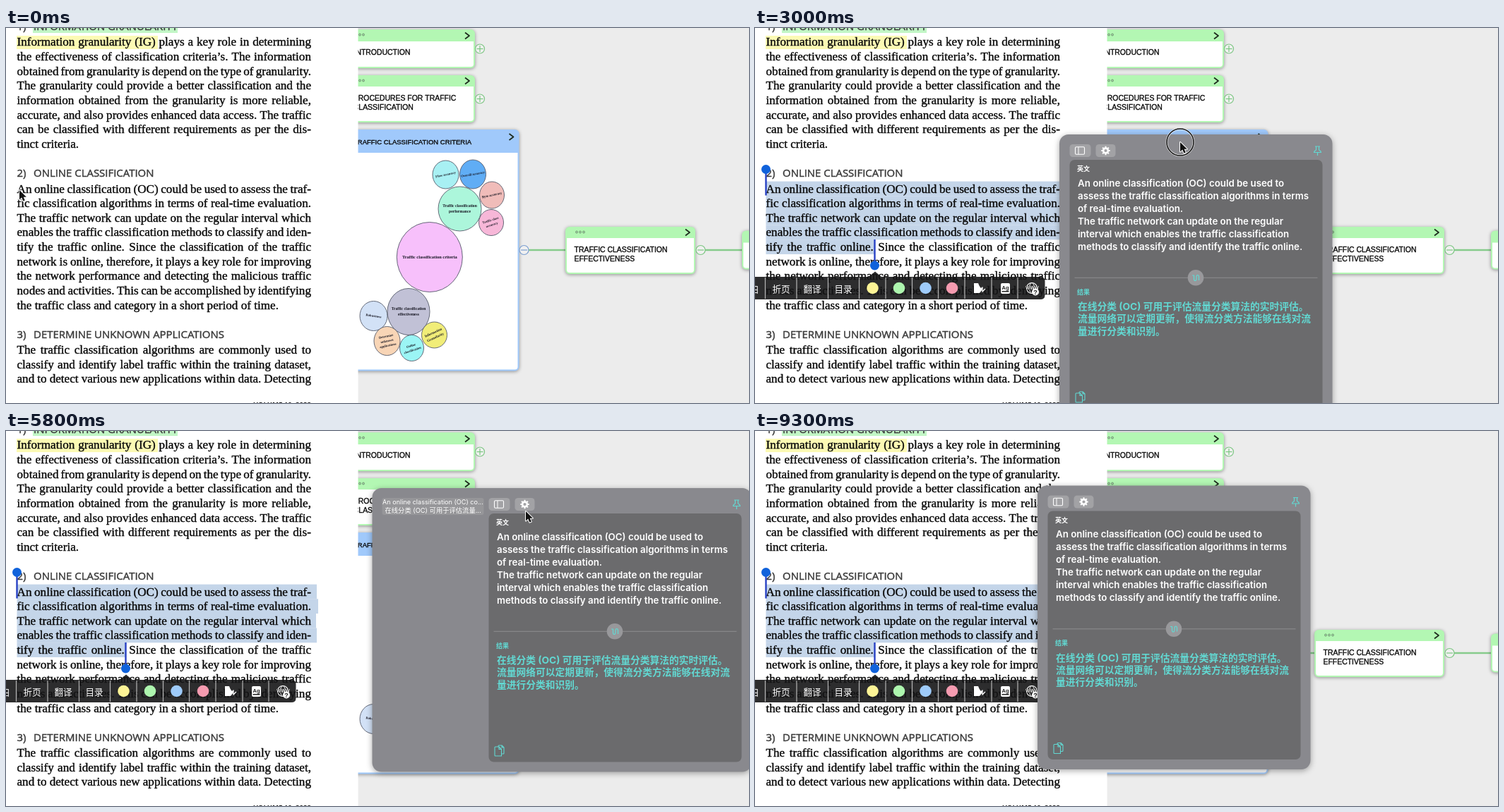
These frames come from a looping animation (1052 by 532 pixels, 9.4 s). An HTML page with a canvas:

```html
<!DOCTYPE html>
<html lang="en">
<head>
<meta charset="utf-8">
<title>Translate selection</title>
<style>
html, body { margin: 0; width: 100%; height: 100%; overflow: hidden; background: #ececec; }
canvas { display: block; }
</style>
</head>
<body>
<canvas id="stage" width="1052" height="532"></canvas>
<script>
const g = document.getElementById('stage').getContext('2d');
const LOOP = 9400, PITCH = 20.65, LEFT = 15.5, COLUMN = 416.5;
const SERIF = '"Liberation Serif", Times, serif';
const SANS = '"Liberation Sans", Arial, sans-serif';
const HEAD = '"Open Sans", sans-serif';
const UI = 'Inter, "Noto Sans CJK SC", "Noto Sans CJK", sans-serif';
const TEAL = '#62d8d2', GREEN = '#b3f7b3';

const paragraphs = [
  { y: 25.4, lines: [
    'Information granularity (IG) plays a key role in determining',
    'the effectiveness of classification criteria’s. The information',
    'obtained from granularity is depend on the type of granularity.',
    'The granularity could provide a better classification and the',
    'information obtained from the granularity is more reliable,',
    'accurate, and also provides enhanced data access. The traffic',
    'can be classified with different requirements as per the dis-',
    'tinct criteria.'], ends: true },
  { y: 233.5, lines: [
    'An online classification (OC) could be used to assess the traf-',
    'fic classification algorithms in terms of real-time evaluation.',
    'The traffic network can update on the regular interval which',
    'enables the traffic classification methods to classify and iden-',
    'tify the traffic online. Since the classification of the traffic',
    'network is online, therefore, it plays a key role for improving',
    'the network performance and detecting the malicious traffic',
    'nodes and activities. This can be accomplished by identifying',
    'the traffic class and category in a short period of time.'], ends: true },
  { y: 462, lines: [
    'The traffic classification algorithms are commonly used to',
    'classify and identify label traffic within the training dataset,',
    'and to detect various new applications within data. Detecting'] }
];
const headings = [
  ['1)', 'INFORMATION GRANULARITY', 3],
  ['2)', 'ONLINE CLASSIFICATION', 211],
  ['3)', 'DETERMINE UNKNOWN APPLICATIONS', 439.5]
];
// x, y, rx, ry, fill, text size, angle in degrees, lines
const bubbles = [
  [622.5, 208, 18.5, 20, '#a8f0f3', 4.7, -12, ['Flow accuracy']],
  [661, 207.5, 18.5, 20.5, '#60adf5', 4.7, -10, ['Overall accuracy']],
  [688, 237, 17.5, 19, '#f0bcb9', 4.8, -12, ['Byte accuracy']],
  [687, 276, 17.5, 18.5, '#f7b7d8', 4.6, -18, ['Traffic class', 'accuracy']],
  [642.5, 256.5, 30.5, 31.5, '#acf6db', 5.6, 0, ['Traffic classification', 'performance']],
  [599.8, 325, 46.5, 49.5, '#f7c0fb', 6.45, 0, ['Traffic classification criteria']],
  [520.5, 408.5, 19.5, 21, '#d2e1f6', 4.6, 8, ['Robustness']],
  [570, 402.5, 30, 33, '#c1c1d6', 5.6, 0, ['Traffic classification', 'effectiveness']],
  [539.5, 444, 18.5, 20.5, '#f8d5b6', 4.6, -12, ['Determine', 'unknown', 'applications']],
  [574.5, 454, 17, 18.5, '#9bf5f5', 4.6, -18, ['Online', 'classification']],
  [606.5, 435.5, 18, 18.5, '#f1ed78', 5, -25, ['Information', 'Granularity']]
];

// Keyframes: time, x, y
const cursorKeys = [
  [0, 19, 230], [250, 19, 230], [1500, 172, 311], [1700, 176, 310], [1900, 176, 310],
  [2200, 82, 372], [2400, 82, 372], [2900, 602, 162], [3000, 602, 162], [3800, 689.5, 92],
  [3900, 689.5, 92], [4100, 646, 122], [4500, 550, 105], [4950, 550, 105], [5400, 680, 112],
  [5800, 736, 114], [6100, 800, 100], [6150, 800, 100], [6750, 681.5, 96.5],
  [7000, 664, 226], [7400, 587, 101], [8100, 587, 101], [8600, 560, -24], [9400, 560, -24]
];
const panelKeys = [[3000, 431, 151], [3800, 518.5, 81], [6150, 518.5, 81], [6750, 400, 77.5]];
const presses = [[250, 1500], [2250, 2350], [2950, 3850], [4650, 4800], [6100, 6780], [7600, 7750]];

const ramp = (t, a, b) => {
  const k = Math.min(1, Math.max(0, (t - a) / (b - a)));
  return k * k * (3 - 2 * k);
};
function track(keys, t) {
  let [, x, y] = keys[0];
  for (let i = 1; i < keys.length; i++) {
    const k = ramp(t, keys[i - 1][0], keys[i][0]);
    x += (keys[i][1] - keys[i - 1][1]) * k;
    y += (keys[i][2] - keys[i - 1][2]) * k;
  }
  return [x, y];
}

// A thin outline ("ink") gives the heavier look of screen type
function text(s, x, y, font, fill, align = 'left', ink = 0) {
  g.font = font; g.fillStyle = fill; g.textAlign = align;
  g.fillText(s, x, y);
  if (ink) {
    g.strokeStyle = fill; g.lineWidth = ink;
    g.strokeText(s, x, y);
  }
}
function rect(x, y, w, h, fill) { g.fillStyle = fill; g.fillRect(x, y, w, h); }
function round(x, y, w, h, r, fill) {
  g.beginPath(); g.roundRect(x, y, w, h, r);
  g.fillStyle = fill; g.fill();
}
function oval(x, y, rx, ry, fill, line, width = 1) {
  g.beginPath(); g.ellipse(x, y, rx, ry, 0, 0, 7);
  if (fill) { g.fillStyle = fill; g.fill(); }
  if (line) { g.strokeStyle = line; g.lineWidth = width; g.stroke(); }
}
function stroke(points, color, width) {
  g.beginPath();
  for (let i = 0; i < points.length; i += 2) g.lineTo(points[i], points[i + 1]);
  g.strokeStyle = color; g.lineWidth = width; g.stroke();
}
function fillPath(path, fill) { g.fillStyle = fill; g.fill(new Path2D(path)); }
function strokePath(path, color, width) {
  g.strokeStyle = color; g.lineWidth = width; g.stroke(new Path2D(path));
}
function at(x, y, draw) { g.save(); g.translate(x, y); draw(); g.restore(); }

function card(x, y, right, bottom, head, main, dots, chevron) {
  g.save();
  g.shadowColor = 'rgba(0,0,0,.4)'; g.shadowBlur = 5; g.shadowOffsetY = 1;
  round(x, y, right - x, bottom - y, 6, main);
  g.restore();
  round(x + 2, y + head, right - x - 4, bottom - y - head - 2, [0, 0, 4, 4], '#fff');
  for (const d of dots) oval(d, y + 7.5, 1.5, 1.5, '#a9cfa9', '#5f8f62', .8);
  if (chevron) {
    const [cx, cy] = chevron;
    stroke([cx - 3, cy - 4.5, cx + 3, cy, cx - 3, cy + 4.5], '#1d2b1d', 1.7);
  }
}
function knob(x, y, color, plus) {
  oval(x, y, 6.5, 6.5, '#f0f0f0', color, 1.2);
  stroke([x - 4.5, y, x + 4.5, y], color, 1.2);
  if (plus) stroke([x, y - 4.5, x, y + 4.5], color, 1.2);
}

function drawMap() {
  const label = (s, x, y, size = 10.45) => text(s, x, y, `${size}px ${SANS}`, '#0a0a0a', 'left', .35);
  rect(0, 0, 1052, 532, '#ececec');
  stroke([740, 315, 792, 315], '#87cb8c', 2.5);
  stroke([990, 315, 1042, 315], '#87cb8c', 2.5);
  card(480, 2, 664, 57, 17, GREEN, [501, 506], [653, 11]);
  label('INTRODUCTION', 492.5, 38);
  card(480, 67, 664, 134, 16, GREEN, [501, 506], [653, 75]);
  label('PROCEDURES FOR TRAFFIC', 491.8, 103);
  label('CLASSIFICATION', 491.8, 115.5);
  card(480, 144, 726.5, 486.5, 33, '#a0c9fb', [], [715.5, 154.5]);
  label('TRAFFIC CLASSIFICATION CRITERIA', 492, 164.5, 9.5);
  card(792, 282, 976, 349, 16, GREEN, [808, 813, 818], [965, 290]);
  label('TRAFFIC CLASSIFICATION', 804.5, 318);
  label('EFFECTIVENESS', 804.5, 330.5);
  card(1042, 287.5, 1100, 342.5, 17, GREEN, []);
  knob(671, 29.5, '#7cc682', true);
  knob(671, 100.5, '#7cc682', true);
  knob(733.5, 315, '#7c9fd0');
  knob(983.5, 315, '#7cc682');

  for (const [x, y, rx, ry, fill, size, angle, lines] of bubbles) {
    oval(x, y, rx, ry, fill, '#555b6a', .9);
    at(x, y, () => {
      g.rotate(angle * Math.PI / 180);
      lines.forEach((s, i) => text(s, 0, (i - (lines.length - 1) / 2) * size * 1.45 + size * .3,
        `bold ${size}px ${SERIF}`, '#161622', 'center'));
    });
  }
}

function justify(s, x, y, width, font) {
  g.font = font;
  const words = s.split(' ');
  const used = words.reduce((sum, w) => sum + g.measureText(w).width, 0);
  const gap = (width - used) / (words.length - 1);
  for (const w of words) {
    text(w, x, y, font, '#0a0a0a', 'left', .4);
    x += g.measureText(w).width + gap;
  }
}

function drawSelection(t, cx, cy) {
  if (t < 280) return;
  const done = t >= 1500;
  const row = done ? 4 : Math.min(4, Math.max(0, Math.floor((cy - 218) / PITCH)));
  const end = done ? 169.5 : cx;
  const ends = [440, 442, 439, 440];
  for (let i = 0; i <= row; i++) {
    const right = i < row ? ends[i] : Math.max(end, LEFT + 1);
    rect(LEFT, 217.6 + i * PITCH, right - LEFT, PITCH + .1, '#c4d5e9');
  }
}
function drawHandles() {
  stroke([15.5, 206, 15.5, 237.5], '#2741c4', 2.4);
  oval(15.5, 200.5, 6.5, 6.5, '#1062db');
  stroke([169.5, 300, 169.5, 333], '#2741c4', 2.4);
  oval(169.5, 337, 6.5, 6.5, '#1062db');
}

function drawPage(t, cx, cy) {
  const body = '17.15px ' + SERIF, head = '14.95px ' + HEAD;
  rect(0, 0, 498.5, 532, '#fff');
  rect(38, 0, 205, 7, '#c2f6c6');
  rect(15, 11, 200, 19, '#fcfab4');
  drawSelection(t, cx, cy);
  for (const [num, title, y] of headings) {
    text(num, 15.5, y, head, '#3c3c3c', 'left', .45);
    text(title, 39, y, head, '#3c3c3c', 'left', .45);
  }
  for (const p of paragraphs) p.lines.forEach((s, i) => {
    const y = p.y + i * PITCH;
    if (p.ends && i === p.lines.length - 1) text(s, LEFT, y, body, '#0a0a0a', 'left', .4);
    else justify(s, LEFT, y, COLUMN, body);
  });
  text('VOLUME 10, 2022', 432, 536.5, 'bold 9.6px ' + HEAD, '#222', 'right');
  if (t >= 1550) drawHandles();
}

function drawToolbar(t) {
  if (t < 1800) return;
  const k = ramp(t, 1770, 2050);
  g.save();
  g.beginPath(); g.rect(0, 340, 10 + 405 * k, 50); g.clip();
  g.globalAlpha = k;
  fillPath('M-20 353H161L170 345.5L179 353H404Q410.500 353 410.500 359V379Q410.500 385 404 385H-20Z', 'rgba(20,20,21,.89)');
  for (const x of [14.5, 59, 103.5, 147.5, 185, 222.5, 259.5, 297, 335, 372])
    rect(x - .6, 354, 1.2, 30, 'rgba(215,215,215,.8)');
  const font = '500 12.6px ' + UI;
  text('白', 5.5, 374.5, font, '#fff', 'right');
  ['折页', '翻译', '目录'].forEach((s, i) => text(s, 37 + 44 * i, 374.5, font, '#fff', 'center'));
  ['#fdf496', '#adf5ae', '#9ecbfa', '#f59bb0'].forEach((c, i) => oval(166.5 + 37.5 * i, 369, 8.3, 8.3, c));
  fillPath('M310 362H316Q318 368 322 371L318 376H310Z', '#fff');
  strokePath('M319 371L322 368L322 374L326 370', '#fff', 1.3);
  round(348, 362, 13, 15, 2, '#fff');
  rect(349.5, 373, 10, 1.5, '#222');
  text('Ag', 354.5, 370.5, 'bold 7.5px ' + SANS, '#222', 'center');
  oval(392, 369, 7.5, 7.5, null, '#fff', 1.2);
  oval(392, 369, 3.5, 7.5, null, '#fff', 1);
  rect(383, 366, 19, 5.5, '#222');
  text('WWW', 392.5, 371, 'bold 6.5px ' + SANS, '#fff', 'center');
  oval(397, 374.5, 5, 5, '#fff');
  text('?', 397, 378, 'bold 9px ' + SANS, '#222', 'center');
  g.restore();
}

function drawGear(x, y) {
  at(x, y, () => {
    g.strokeStyle = '#fff'; g.lineWidth = 2;
    for (let i = 0; i < 8; i++) {
      g.beginPath(); g.moveTo(0, 3.5); g.lineTo(0, 6.2); g.stroke();
      g.rotate(Math.PI / 4);
    }
    oval(0, 0, 3.4, 3.4, null, '#fff', 2.6);
  });
}

function drawContent() {
  round(14.5, 36, 358, 352.5, 7, '#6b6b6d');
  round(14.5, 14, 30, 18, 4.5, '#a2a2a5');
  g.beginPath(); g.roundRect(22.5, 17.8, 13, 10.5, 1.5);
  g.strokeStyle = '#fff'; g.lineWidth = 1.1; g.stroke();
  stroke([27, 18, 27, 28], '#fff', 1);
  round(51.5, 14, 28, 18, 4.5, '#a2a2a5');
  drawGear(65.5, 23);
  strokePath('M362 17H369M363.500 17V22Q360.500 23.500 360.500 25.500H370.500Q370.500 23.500 367.500 22V17M365.500 25.500V30', TEAL, 1.2);

  text('英文', 25, 52.3, 'bold 9px ' + UI, '#fff');
  ['An online classification (OC) could be used to',
    'assess the traffic classification algorithms in terms',
    'of real-time evaluation.',
    'The traffic network can update on the regular',
    'interval which enables the traffic classification',
    'methods to classify and identify the traffic online.'
  ].forEach((s, i) => text(s, 26, 73.6 + 18 * i, '600 13.3px ' + UI, '#fff'));

  rect(21.5, 202.8, 344, 1, '#8d8d90');
  oval(193, 203.3, 11.3, 11.3, '#98989b');
  strokePath('M188 200H190.500V205Q190.500 207.500 192.200 207.500T194 205V202Q194 199.500 195.700 199.500T197.500 202V207', TEAL, 1.2);

  text('结果', 25, 226.8, 'bold 9px ' + UI, TEAL);
  ['在线分类 (OC) 可用于评估流量分类算法的实时评估。',
    '流量网络可以定期更新，使得流分类方法能够在线对流',
    '量进行分类和识别。'
  ].forEach((s, i) => text(s, 26, 249 + 17.4 * i, 'bold 13.75px ' + UI, TEAL));

  strokePath('M28 367V366Q28 365 29 365H33L36 368V376Q36 377 35 377H33M33 365V368H36M24 367H29L32.500 370.500V380H24Q23 380 23 379V368Q23 367 24 367M29 367V370.500H32.500', TEAL, 1.1);
}

function drawPanel(t) {
  if (t < 2420) return;
  const [x, y] = track(panelKeys, t);
  const open = ramp(t, 4750, 5050) - ramp(t, 7700, 8000);
  const width = 386.5 + 150.5 * open;
  g.save();
  g.globalAlpha = ramp(t, 2400, 2550);
  g.translate(x, y);
  g.save();
  g.shadowColor = 'rgba(0,0,0,.35)'; g.shadowBlur = 8; g.shadowOffsetY = 2;
  round(0, 0, width, 402.5, 13, '#89898e');
  g.restore();
  g.beginPath(); g.roundRect(0, 0, width, 402.5, 13); g.clip();
  if (open > 0) {
    g.save();
    g.globalAlpha *= open;
    g.translate(150.5 * (open - 1), 0);
    round(14, 14, 144, 24, 3, '#969699');
    text('An online classification (OC) co...', 14.5, 23.3, '9.1px ' + UI, '#fff');
    text('在线分类 (OC) 可用于评估流量...', 18, 35.3, '9.3px ' + UI, '#fff');
    g.restore();
  }
  at(150.5 * open, 0, drawContent);
  g.restore();
}

function drawCursor(t, x, y) {
  if (presses.some(([a, b]) => t >= a && t < b)) {
    oval(x, y, 19, 19, null, 'rgba(255,255,255,.7)', 3);
    oval(x, y, 19, 19, null, '#111', 1.5);
  }
  at(x, y, () => {
    const arrow = 'M0 0V13.500L3.200 10.600L5.400 15.600L7.800 14.600L5.700 9.800H9.800Z';
    strokePath(arrow, '#fff', 2);
    fillPath(arrow, '#111');
  });
}

function frame(now) {
  const t = now % LOOP;
  const [x, y] = track(cursorKeys, t);
  g.lineJoin = 'round';
  drawMap();
  drawPage(t, x, y);
  drawToolbar(t);
  drawPanel(t);
  drawCursor(t, x, y);
}

const start = performance.now();
function tick() {
  frame(performance.now() - start);
  requestAnimationFrame(tick);
}
tick();
</script>
</body>
</html>
```
